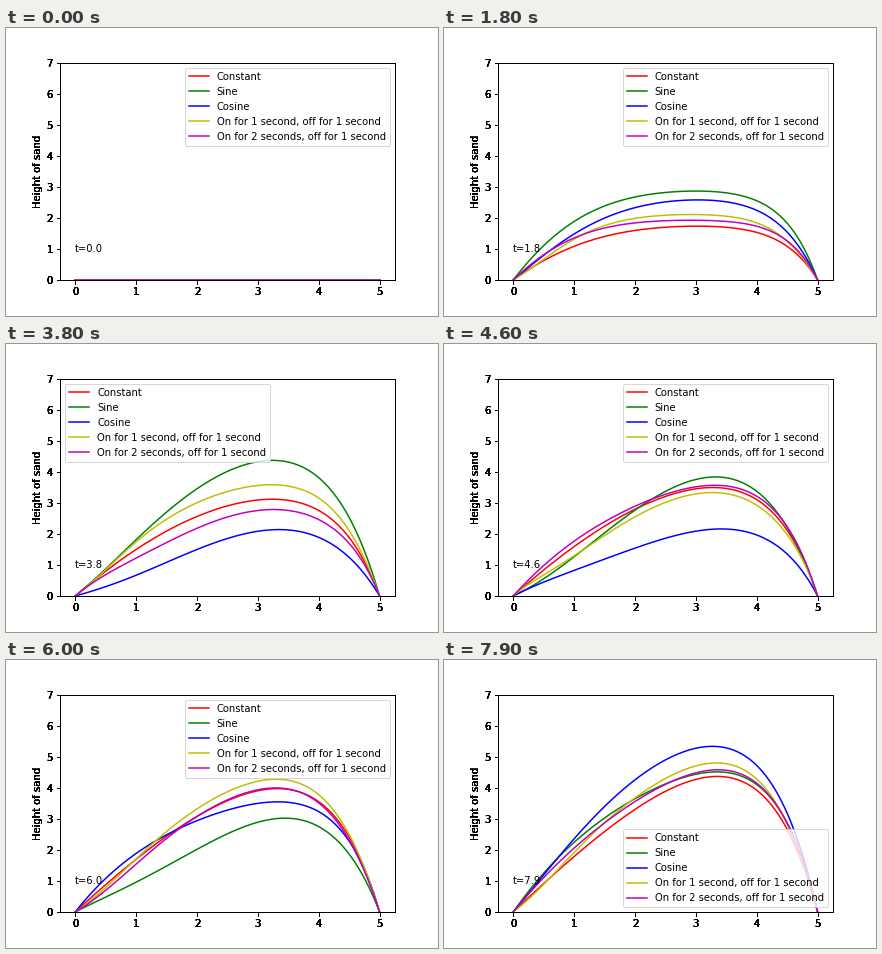
Recreate the animation shown at these times as a matplotlib script. Size 432x288 px, loop 8000 ms.

```python
import numpy as np
import matplotlib.pyplot as plt
from matplotlib.animation import FuncAnimation

FRAMES, INTERVAL = 80, 100
LENGTH, WIND, DIFF = 5.0, 0.5, 0.5
STEPS = 10              # substeps per frame
LAYERS = 8              # stacked axes thicken the tick labels

SOURCES = [
    ("Constant", "r", lambda t: 1.0),
    ("Sine", "g", lambda t: 0.9745 * (1 + np.sin(t))),
    ("Cosine", "b", lambda t: 0.974 * (1 + np.cos(t))),
    ("On for 1 second, off for 1 second", "y",
     lambda t: 2.146 * (round(t) % 2 == 1)),
    ("On for 2 seconds, off for 1 second", "m",
     lambda t: 1.5 * (round(t) % 3 > 0)),
]

# Sand drifting with the wind and spreading, h = 0 at both ends,
# solved by eigenmodes: h_t = DIFF h_xx - WIND h_x + source(t)
x = np.linspace(0, LENGTH, 101)
n = np.arange(1, 101)
k = n * np.pi / LENGTH
tilt = WIND / (2 * DIFF)
rate = DIFF * k**2 + WIND**2 / (4 * DIFF)
weight = 2 / LENGTH * k * (1 - (-1.0)**n * np.exp(-tilt * LENGTH)) / (tilt**2 + k**2)
modes = np.exp(tilt * x)[:, None] * np.sin(np.outer(x, k)) * weight


def solve(source):
    dt = INTERVAL / 1000 / STEPS
    decay = np.exp(-rate * dt)
    gain = (1 - decay) / rate
    q = np.zeros(len(n))
    heights = []
    for i in range(FRAMES):
        heights.append(modes @ q)
        for j in range(STEPS):
            q = decay * q + gain * source((i * STEPS + j + 0.5) * dt)
    return heights


def add_axes(fig):
    ax = fig.add_axes([0.125, 0.125, 0.775, 0.755], facecolor="none")
    ax.set_xlim(-0.25, 5.25)
    ax.set_ylim(0, 7)
    ax.set_ylabel("Height of sand")
    return ax


plt.rcParams["font.family"] = "DejaVu Sans"
plt.rcParams["font.size"] = 10
fig = plt.figure(figsize=(6, 4), dpi=72, facecolor="white")
for _ in range(LAYERS):
    ax = add_axes(fig)

curves = [solve(source) for _, _, source in SOURCES]
lines = [ax.plot(x, 0 * x, color=color, lw=1.5, label=name)[0]
         for name, color, _ in SOURCES]
clock = ax.text(0, 0.9, "t=0.0")
ax.legend(loc="best")


def update(i):
    for line, heights in zip(lines, curves):
        line.set_ydata(heights[i])
    clock.set_text(f"t={i * INTERVAL / 1000:.1f}")
    return [*lines, clock]


anim = FuncAnimation(fig, update, frames=FRAMES, interval=INTERVAL,
                     repeat=True, repeat_delay=0, blit=False)
plt.show()
```
